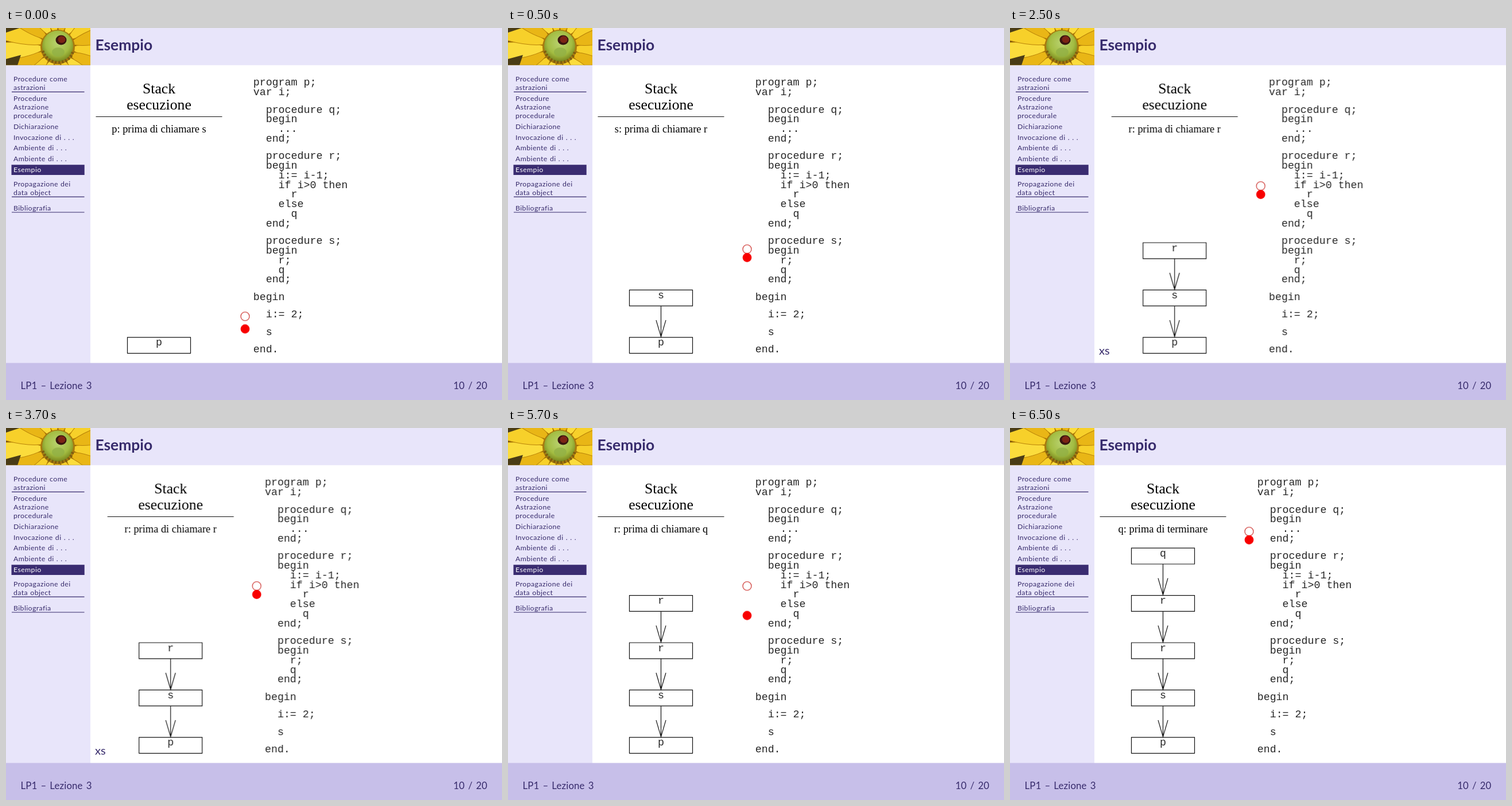
Recreate the animation shown at these times as an HTML page. Size 864 by 648 pixels, loop 8 s.

```html
<!DOCTYPE html>
<html lang="it">
<head>
<meta charset="utf-8">
<title>Esempio</title>
<style>
  html, body { margin: 0; width: 100%; height: 100%; overflow: hidden; background: #fff; }
  svg { display: block; width: 864px; height: 648px; }
  .sans { font-family: Lato, "Open Sans", sans-serif; fill: #372b6c; }
  .side { font-size: 12.3px; letter-spacing: .42px; word-spacing: .6px; }
  .foot { font-size: 16.8px; letter-spacing: .15px; word-spacing: 1.6px; }
  .code { font: 18.3px "Liberation Mono", "Courier New", monospace; fill: #262626; white-space: pre; }
  .serif { font-family: "Liberation Serif", "Times New Roman", serif; fill: #000; }
  .mid { text-anchor: middle; }
  .line { fill: none; stroke: #111; stroke-width: 1.2; }

  /* hard cuts at 0.5, 2.5, 4.5 and 6.5 s of an 8 s loop */
  .anim { animation: 8s step-end infinite; }
  .slide { animation-name: slide; }
  .ring { animation-name: ring; }
  .dot { animation-name: dot; }
  .from1 { animation-name: from1; }
  .from2 { animation-name: from2; }
  .from3 { animation-name: from3; }
  .from4 { animation-name: from4; }
  .only0 { animation-name: only0; }
  .only1 { animation-name: only1; }
  .only2 { animation-name: only2; }
  .only3 { animation-name: only3; }

  @keyframes slide {
    0%, 56.25%, 100% { transform: none; }
    31.25% { transform: translateX(20.2px); }
  }
  @keyframes ring {
    0%, 100% { transform: translateY(502.3px); }
    6.25% { transform: translateY(385.2px); }
    31.25%, 56.25% { transform: translateY(275.2px); }
    81.25% { transform: translateY(180.3px); }
  }
  @keyframes dot {
    0%, 100% { transform: translateY(524.2px); }
    6.25% { transform: translateY(399.8px); }
    31.25% { transform: translateY(289.9px); }
    56.25% { transform: translateY(326.6px); }
    81.25% { transform: translateY(194.8px); }
  }
  @keyframes from1 { 0% { opacity: 0; } 6.25%, 100% { opacity: 1; } }
  @keyframes from2 { 0% { opacity: 0; } 31.25%, 100% { opacity: 1; } }
  @keyframes from3 { 0% { opacity: 0; } 56.25%, 100% { opacity: 1; } }
  @keyframes from4 { 0% { opacity: 0; } 81.25%, 100% { opacity: 1; } }
  @keyframes only0 { 0% { opacity: 1; } 6.25%, 100% { opacity: 0; } }
  @keyframes only1 { 0%, 31.25%, 100% { opacity: 0; } 6.25% { opacity: 1; } }
  @keyframes only2 { 0%, 56.25%, 100% { opacity: 0; } 31.25% { opacity: 1; } }
  @keyframes only3 { 0%, 81.25%, 100% { opacity: 0; } 56.25% { opacity: 1; } }
</style>
</head>
<body>
<svg viewBox="0 0 864 648">
  <defs>
    <radialGradient id="bud" cx=".5" cy=".4" r=".6">
      <stop offset="0" stop-color="#b9d270"/>
      <stop offset=".65" stop-color="#a3bd42"/>
      <stop offset="1" stop-color="#78851c"/>
    </radialGradient>
    <clipPath id="photo"><path d="M0 0H147V64.5H0z"/></clipPath>
    <path id="petal" d="M20 0Q50 -17 112 -15V15Q50 17 20 0z"/>
    <path id="box" class="line" d="M211.5 0h110v27.8h-110z"/>
    <path id="arrow" class="line" d="M266.5 27.8V82M258 52.5L266.5 81.5L275 52.5"/>
  </defs>

  <path fill="#fff" d="M0 0H864V648H0z"/>
  <path fill="#e8e5fa" d="M0 0H864V64.7H147V584H0z"/>
  <path fill="#c7bfe9" d="M0 583.5H864V648H0z"/>

  <g clip-path="url(#photo)">
    <path fill="#6d4c0c" d="M0 0H147V65H0z"/>
    <g id="petals"></g>
    <path fill="#4a3c16" d="M0 0H24L0 8zM0 65V54L26 47L20 65z"/>
    <circle cx="90" cy="33" r="30" fill="#a87a0e"/>
    <circle cx="90" cy="31.5" r="27" fill="url(#bud)"/>
    <path fill="none" stroke="#7d5c10" stroke-width="5" stroke-dasharray="3 3" d="M64 40Q72 60 92 60Q112 58 117 40"/>
    <ellipse cx="91" cy="42" rx="11" ry="8" fill="#8fae45" opacity=".7"/>
    <ellipse cx="96" cy="21" rx="9.5" ry="8.5" fill="#3a1510"/>
    <ellipse cx="97" cy="20" rx="6.5" ry="6" fill="#7c2415"/>
  </g>

  <path fill="#3a2c71" d="M9.5 238.3H136.7V256H9.5z"/>
  <path stroke="#372b6c" stroke-width="1.2" d="M10 111.4H136.5M10 294.2H136.5M10 321H136.5"/>
  <g id="side" class="sans side"></g>
  <text class="sans" x="155.5" y="39.4" font-size="26.4" font-weight="700">Esempio</text>
  <g class="sans foot">
    <text x="25.5" y="629">LP1 – Lezione 3</text>
    <text x="838.5" y="629" text-anchor="end">10 / 20</text>
  </g>
  <text class="sans anim only2" x="155" y="568.5" font-size="20">xs</text>

  <g class="anim slide">
    <g class="serif mid" font-size="25.7">
      <text x="266.5" y="113.7">Stack</text>
      <text x="266.5" y="142">esecuzione</text>
    </g>
    <path class="line" d="M156.5 154.5H376.5"/>
    <g class="serif mid" font-size="18.4">
      <text class="anim only0" x="266.5" y="182">p: prima di chiamare s</text>
      <text class="anim only1" x="266.5" y="182">s: prima di chiamare r</text>
      <text class="anim only2" x="266.5" y="182">r: prima di chiamare r</text>
      <text class="anim only3" x="266.5" y="182">r: prima di chiamare q</text>
      <text class="anim from4" x="266.5" y="182">q: prima di terminare</text>
    </g>
    <g id="stack"></g>
    <g id="code" class="code"></g>
    <circle class="anim ring" cx="416.5" r="7.5" fill="#fff" stroke="#c8201c" stroke-width="1.1"/>
    <circle class="anim dot" cx="416.5" r="7.9" fill="#f80000"/>
  </g>
</svg>
<script>
  const byId = id => document.getElementById(id);
  const text = (x, y, s, attrs = "") =>
    `<text x="${x}" y="${y}" ${attrs}>${s.replace(/>/g, "&gt;")}</text>`;

  // overlapping petals around the flower's heart
  const petals = 17, shades = ["#f7d02a", "#e9b616", "#fbdc3c"];
  byId("petals").innerHTML = Array.from({ length: petals }, (_, i) =>
    `<use href="#petal" fill="${shades[i % 3]}" stroke="#b98308"
      transform="translate(90 33) rotate(${i * 360 / petals + 6})"/>`).join("");

  const side = [
    [93, "Procedure come"], [108, "astrazioni"],
    [127, "Procedure"], [142, "Astrazione"], [157, "procedurale"],
    [175.7, "Dichiarazione"], [194.5, "Invocazione di . . ."],
    [213.2, "Ambiente di . . ."], [232, "Ambiente di . . ."],
    [250.7, "Esempio"],
    [275.8, "Propagazione dei"], [291, "data object"], [318, "Bibliografia"]
  ];
  byId("side").innerHTML = side.map(([y, s]) =>
    text(13, y, s, s === "Esempio" ? 'style="fill:#fff"' : "")).join("");

  const program = `program p;
var i;

  procedure q;
  begin
    ...
  end;

  procedure r;
  begin
    i:= i-1;
    if i>0 then
      r
    else
      q
  end;

  procedure s;
  begin
    r;
    q
  end;

begin

  i:= 2;

  s

end.`;
  const charW = 10.98, lineH = 16.78, gapH = 13.65;
  let y = 100.3 - lineH, out = "";
  for (const row of program.split("\n")) {
    y += row ? lineH : gapH;
    const code = row.trimStart();
    if (code) out += text(430.7 + (row.length - code.length) * charW, y, code);
  }
  byId("code").innerHTML = out;

  byId("stack").innerHTML = [..."psrrq"].map((name, i) =>
    `<g class="${i ? "anim from" + i : ""}"><g transform="translate(0 ${538.8 - i * 82.4})">
      <use href="#box"/>${i ? '<use href="#arrow"/>' : ""}
      ${text(266.5, 14.6, name, 'class="code mid"')}</g></g>`).join("");
</script>
</body>
</html>
```
